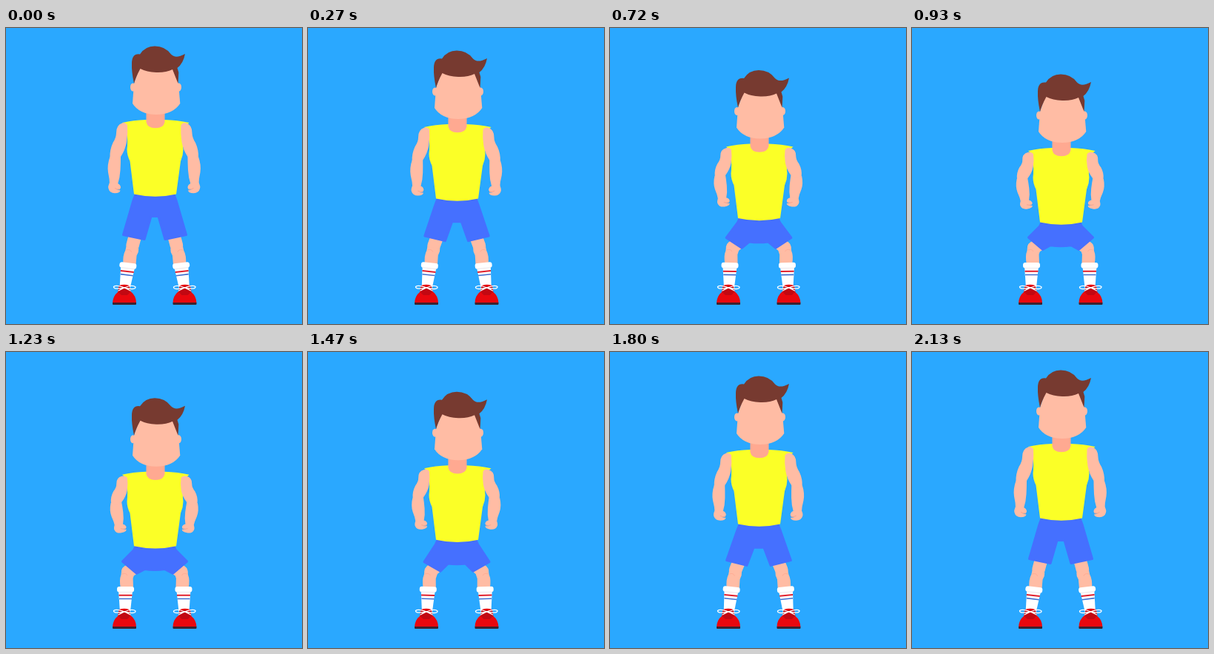
These frames come from a looping animation (400 by 400 pixels, 2.25 s). An HTML page:

```html
<!DOCTYPE html>
<html lang="en">
<head>
<meta charset="utf-8">
<title>Squats</title>
<style>
html, body { margin: 0; width: 100%; height: 100%; overflow: hidden; background: #2aa8ff; }
svg { display: block; width: 100%; height: 100%; }
</style>
</head>
<body>
<svg viewBox="0 0 400 400">
  <!-- legs -->
  <g id="leg">
    <path id="thigh" stroke="#ffbca4" stroke-width="17.500" stroke-linecap="round"/>
    <g id="shin">
      <path fill="#ffbca4" d="M156 296H173Q174 301 171.500 306L172 320H155Q152.500 308 155.500 301Z"/>
      <path fill="none" stroke="#ffa991" stroke-width=".8" d="M157 300Q162 298 164 302"/>
      <path fill="#fff" d="M152 322H171L168 351H154Z"/>
      <rect fill="#fff" x="150" y="317" width="23" height="7.500" rx="3"/>
      <path stroke="#e8e4e8" stroke-width=".8" d="M152 324.500H171"/>
      <path stroke="#e2202c" stroke-width="2" d="M152.500 328.800H170.500"/>
      <path stroke="#3f6fd0" stroke-width="1.600" d="M153 333.500H170"/>
    </g>
    <path fill="#e8080f" d="M144 371.500Q144.500 362 151 357L152.500 348Q160 345.500 166.500 348L168.500 356Q176 362 176 371.500Z"/>
    <path fill="#c20812" d="M153 349H167L168 357L164 361H156L151.500 357Z"/>
    <path fill="#3d2230" d="M144 371H176V373Q176 374 175 374H145Q144 374 144 373Z"/>
    <path fill="none" stroke="#fff" stroke-width="1.300" stroke-linecap="round" d="M160 351Q149 346.500 145.500 349.500Q145 354 160 351Q171 346.500 175 350Q175.500 354.500 160 351L152 355M160 351L168 355"/>
  </g>
  <use href="#leg" transform="matrix(-1 0 0 1 401.500 0)"/>
  <path id="shorts" fill="#4570ff" stroke="#4570ff" stroke-width="3" stroke-linejoin="round"/>

  <!-- torso and head -->
  <g id="body">
    <path fill="#fbff27" d="M157 128Q172 124.500 189 124H214Q232 124.500 247.500 128L240 135Q238 155 239.500 164Q239.500 172 236 180L230 224.500Q202 231 173 224.500L167.500 180Q163.500 172 163.500 164Q165 155 163 133Z"/>
    <path fill="#ffa991" d="M189.500 108H214.500V127Q213 135.300 202 135.300Q191 135.300 189.500 127Z"/>
    <ellipse fill="#ffbca4" cx="171.500" cy="80" rx="3.500" ry="5.500"/>
    <ellipse fill="#ffbca4" cx="233.500" cy="80" rx="3.500" ry="5.500"/>
    <path fill="#ffbca4" d="M181 52H226L233 75L235.300 102Q226 116.500 203 117Q180 116.500 171 102L173 75Z"/>
    <path fill="#773a30" d="M173 75Q169.500 59 170 48Q170 34 181 35.500Q188 24.500 201 24.500Q215 24.500 223 35.500Q229 42 242 35Q239.500 48 231.500 54L233.300 60Q233 69 232.500 75L225 56Q216 60.500 203 60Q190 59.500 181.500 55Q175 67 173 75Z"/>
  </g>

  <!-- arms -->
  <g id="arm" fill="#ffbca4">
    <g id="forearm">
      <path d="M140.500 174Q136.500 185 138 195Q140 204 140 211L151 211Q154 202 154.500 192Q155 183 155 174Z"/>
      <path d="M140 209Q137.500 214 138.500 217Q140 223 147 223.200Q154 223 154.500 219.500L149 218.500Q155 219 155 215Q154.500 211.500 151 210Z"/>
      <path fill="none" stroke="#f79f88" stroke-width=".8" d="M147 216.500Q150 218.500 154 218"/>
    </g>
    <path id="upper" d="M157 128.500Q149 131 149 142Q149 148 144.500 155Q140 165 140.500 175Q142 178 148 178Q153 178 155 174Q161 165 163 154Q165 142 164 131Q161 127 157 128.500Z"/>
  </g>
  <use href="#arm" transform="matrix(-1 0 0 1 400.500 0)"/>
</svg>
<script>
const $ = id => document.getElementById(id);
const LOOP = 2250, STEP = 30, DEPTH = 38.3;
const mix = (a, b, k) => a + (b - a) * k;

// Cubic ease with control points (.42, 0) and (.58, 1)
function ease(x) {
  if (x <= 0) return 0;
  if (x >= 1) return 1;
  let lo = 0, hi = 1, s;
  for (let i = 0; i < 20; i++) {
    s = (lo + hi) / 2;
    const v = 3 * s * (1 - s) * (0.42 * (1 - s) + 0.58 * s) + s ** 3;
    if (v < x) lo = s; else hi = s;
  }
  return s * s * (3 - 2 * s);
}

const squat = t => ease(t / 990) - ease((t - 1150) / 950);

function shortsPath(k) {
  const bulge = 8 * k * (1 - k), top = 225 + DEPTH * k;
  const left = [
    [175, top],
    [mix(172, 172.5, k), top + mix(8, 5, k)],
    [mix(158.5, 157.5, k) - bulge / 2, mix(279.5, 283, k) + bulge],
    [mix(187, 176.5, k), mix(285.5, 299.5, k)],
    [mix(196, 187, k), mix(254.5, 294, k) + bulge]
  ];
  const right = left.map(([x, y]) => [402 - x, y]).reverse();
  const [crotch, ...rest] = right;
  return `M${left.join("L")}Q201 ${crotch[1] + 2 * k} ${crotch}L${rest.join("L")}Q202 ${top + 6} ${left[0]}Z`;
}

function draw(now) {
  const t = Math.min(Math.floor(now % LOOP / STEP) * STEP, 2130);
  const k = squat(t), drop = DEPTH * k, bend = 1 - 0.235 * k;
  $("body").setAttribute("transform", `translate(0 ${drop})`);
  $("thigh").setAttribute("d",
    `M${mix(171, 164.5, k)} ${mix(294, 297, k)}L${mix(179, 186, k)} ${mix(264, 284, k)}`);
  $("shin").setAttribute("transform", `rotate(${7 * (1 - k)} 161 348)`);
  $("upper").setAttribute("transform",
    `matrix(1 0 ${0.036 * k} ${bend} 0 ${135 + drop}) translate(0 -135)`);
  $("forearm").setAttribute("transform",
    `translate(${148 + 1.5 * k} ${135 + drop + 42 * bend}) rotate(${-11 * k}) scale(1 ${1 - 0.14 * k}) translate(-148 -177)`);
  $("shorts").setAttribute("d", shortsPath(k));
  requestAnimationFrame(() => draw(performance.now()));
}
draw(performance.now());
</script>
</body>
</html>
```
